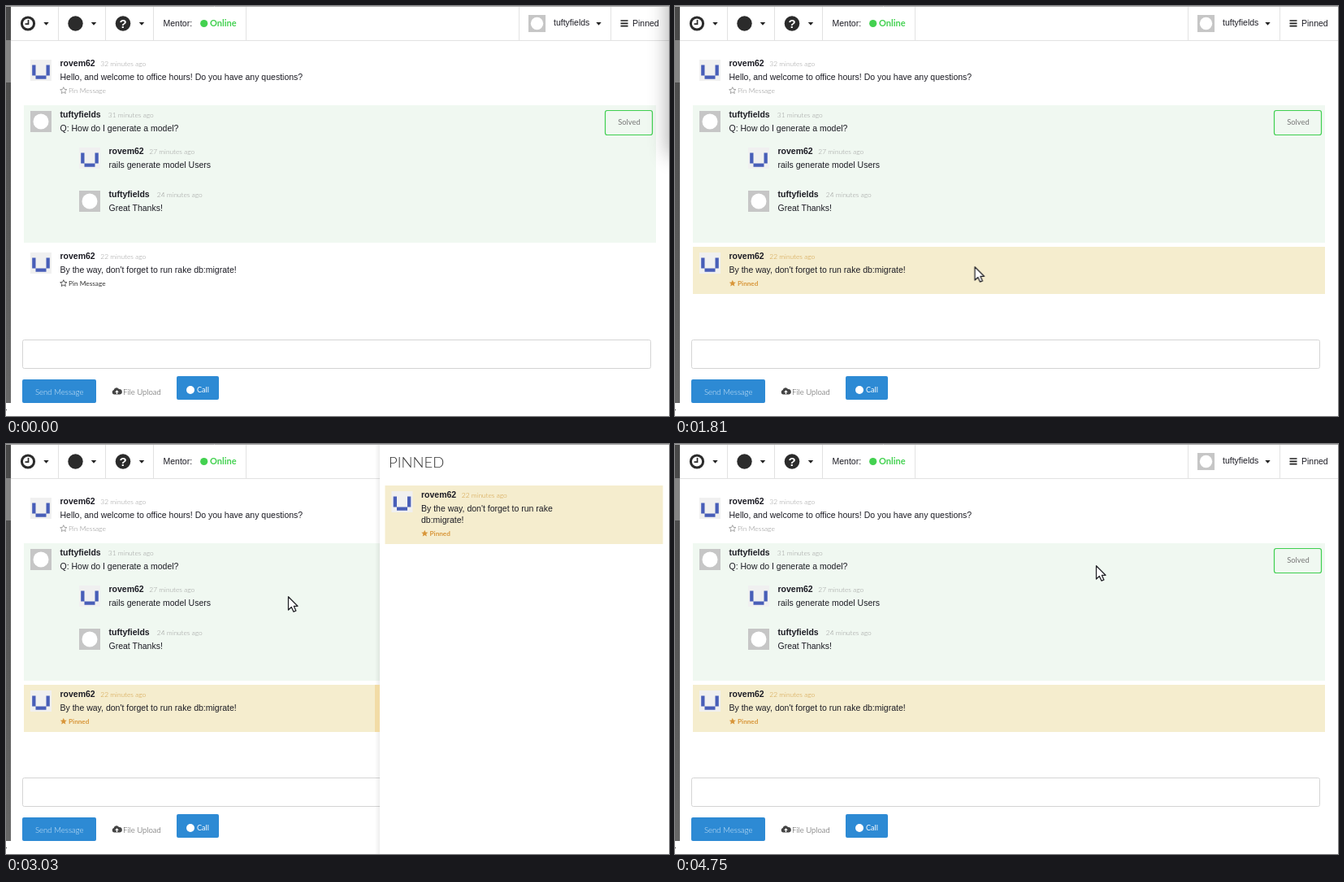
Write an HTML page that moves like this. It is 816 by 504 pixels and loops after 5.88 s.

```html
<!DOCTYPE html>
<html lang="en">
<head>
<meta charset="utf-8">
<title>Pin a message</title>
<style>
html, body { margin: 0; width: 100%; height: 100%; overflow: hidden; background: #fff; }
svg { display: block; width: 100vw; height: 100vh; }
text { font: 10.5px "Liberation Sans", Arial, sans-serif; fill: #1c1c24; }
.name { font-weight: bold; }
.lato { font-family: Lato, sans-serif; font-weight: 300; }
.small { font-size: 8.4px; fill: #999; }
.label { font-size: 9.6px; fill: #444; }
.link .small { font-size: 8.5px; fill: #8c8c8c; }
.link use { fill: none; stroke: #8f8f8f; stroke-width: .8; }
.dark .small { fill: #333; font-weight: 400; font-size: 8.3px; }
.dark use { stroke: #333; }
.pinned .small { fill: #d09a3c; }
.pinned .link .small { font-size: 8.2px; font-weight: 700; fill: #d8963a; }
.pinned .link use { fill: #d8963a; stroke: none; }

/* Every part shares one 5880 ms clock. */
.anim { animation: 5.88s linear infinite; }
.toggle { animation-timing-function: step-end; }
#edge { animation-name: edge; }
#plain { animation-name: plain; }
#pin-row { animation-name: pin-row; }
#idle-link { animation-name: idle-link; }
#hover-link { animation-name: hover-link; }
#panel { animation-name: panel; }
#panel-shade { animation-name: panel-shade; }
#pointer { animation-name: pointer; }
#arrow { animation-name: arrow; }
#hand { animation-name: hand; }

@keyframes edge { 0% { opacity: 1 } 23.13%, 100% { opacity: 0 } }
@keyframes plain { 0% { opacity: 1 } 24.66%, 100% { opacity: 0 } }
@keyframes pin-row { 0% { opacity: 0 } 24.66%, 100% { opacity: 1 } }
@keyframes idle-link { 0% { opacity: 0 } 1.7% { opacity: 1 } 15.4%, 100% { opacity: 0 } }
@keyframes hover-link { 0% { opacity: 1 } 1.7% { opacity: 0 } 15.4%, 100% { opacity: 1 } }
@keyframes panel {
  0%, 41.84% { transform: translateX(356px); animation-timing-function: ease }
  46.43%, 67.35% { transform: translateX(0); animation-timing-function: ease }
  71.94%, 100% { transform: translateX(356px) }
}
@keyframes panel-shade { 0% { opacity: 0 } 41.84% { opacity: 1 } 67.35%, 100% { opacity: 0 } }
@keyframes arrow { 0% { opacity: 0 } 1.02% { opacity: 1 } 35.7% { opacity: 0 } 46.9%, 100% { opacity: 1 } }
@keyframes hand { 0% { opacity: 0 } 35.7% { opacity: 1 } 46.9%, 100% { opacity: 0 } }
@keyframes pointer {
  0%, 1.02% { transform: translate(80px, 346px) }
  3.23%, 10.71% { transform: translate(152px, 388px) }
  13.4% { transform: translate(106px, 371px) }
  15.8% { transform: translate(58px, 351px) }
  18.37%, 28.74% { transform: translate(74px, 343px) }
  29.76% { transform: translate(205px, 396px) }
  30.78% { transform: translate(367px, 321px) }
  33.2% { transform: translate(560px, 190px) }
  36.2% { transform: translate(786px, 18px) }
  38.1%, 39.12% { transform: translate(776px, 24px) }
  41.5%, 46.77% { transform: translate(769px, 33px) }
  48.81% { transform: translate(540px, 60px) }
  50.6% { transform: translate(334px, 177px) }
  51.53%, 79.42% { transform: translate(347px, 187px) }
  80.78%, 100% { transform: translate(518px, 149px) }
}
</style>
</head>
<body>
<svg viewBox="0 0 816 504" preserveAspectRatio="none">
  <defs>
    <path id="star" d="M0-4.3 1.18-1.62 4.09-1.33 1.9.62 2.53 3.48 0 2-2.53 3.48-1.9.62-4.09-1.33-1.18-1.62Z"/>
    <path id="caret" d="M-3.2-1.5H3.2L0 2.2Z" fill="#222"/>
    <g id="mentor">
      <rect width="26" height="26" fill="#f0f0f0"/>
      <path d="M2.2 6.5h4.3v13h13v-13h4.3v13h-4.3v4.3h-13v-4.3h-4.3Z" fill="#485eb8"/>
    </g>
    <g id="student">
      <rect width="26" height="26" fill="#c6c6c6"/>
      <circle cx="13" cy="13" r="9.5" fill="#fff"/>
    </g>
    <linearGradient id="shade"><stop stop-opacity="0"/><stop offset="1" stop-opacity=".07"/></linearGradient>
    <linearGradient id="strip" x2="0" y2="1"><stop stop-color="#484848"/><stop offset="1" stop-color="#686868"/></linearGradient>
    <filter id="blur" x="-300%" y="-30%" width="700%" height="160%"><feGaussianBlur stdDeviation="12"/></filter>
  </defs>
  <rect width="816" height="504" fill="#fff"/>

  <g id="sidebar">
    <rect width="6" height="488" fill="url(#strip)"/>
    <rect y="42" width="6" height="52" fill="#848484"/>
    <rect y="496" width="1" height="1" fill="#333"/>
  </g>

  <g id="header">
    <path d="M6 42.5H816M64.5 1V42M122.5 1V42M181.5 1V42M295.5 1V42M631.5 1V42M744.5 1V42" stroke="#e2e2e2"/>
    <circle cx="27" cy="21.5" r="7.6" fill="none" stroke="#2b2b2b" stroke-width="3"/>
    <path d="M27.5 17V22.2H23.5" fill="none" stroke="#2b2b2b" stroke-width="1.7"/>
    <circle cx="85.5" cy="21.5" r="9.2" fill="#2b2b2b"/>
    <circle cx="144" cy="21.5" r="9.3" fill="#2b2b2b"/>
    <text x="144" y="27" text-anchor="middle" style="font-size:15px;font-weight:bold;fill:#fff">?</text>
    <use href="#caret" x="49.5" y="21.5"/><use href="#caret" x="108" y="21.5"/>
    <use href="#caret" x="167" y="21.5"/><use href="#caret" x="729.5" y="21.5"/>
    <text x="193.5" y="25">Mentor:</text>
    <circle cx="243.7" cy="21.5" r="4.6" fill="#43d150"/>
    <text class="lato" x="251" y="25" style="font-size:11px;font-weight:700;fill:#43d150">Online</text>
    <use href="#student" transform="translate(643 11) scale(.81)"/>
    <text x="674" y="24">tuftyfields</text>
    <path d="M756.5 18h9M756.5 21.3h9M756.5 24.6h9" stroke="#222" stroke-width="1.7"/>
    <text x="771" y="25">Pinned</text>
  </g>

  <rect x="22" y="122" width="778" height="169" fill="#f0f8f1"/>
  <rect x="737.5" y="128.5" width="58" height="30" rx="2.5" fill="none" stroke="#3fcf50" stroke-width="1.2"/>
  <text class="lato label" x="767" y="146" text-anchor="middle" style="font-size:9.4px;font-weight:400;fill:#777">Solved</text>
  <g id="thread"></g>
  <g id="plain" class="anim toggle"></g>
  <g id="pin-row" class="anim toggle pinned"></g>

  <g id="composer">
    <rect x="20.5" y="410.5" width="773" height="35" rx="2" fill="#fff" stroke="#d4d4d4"/>
    <rect x="20" y="459" width="91" height="29" rx="2" fill="#2d8ad4"/>
    <text class="lato label" x="36" y="477.5" style="fill:#d5eafa">Send Message</text>
    <path d="M133 477.5a2.8 2.8 0 0 1-.4-5.4a3.5 3.5 0 0 1 6.5-1a2.6 2.6 0 0 1 1 6.4Z" fill="#444"/>
    <path d="M135.8 477v-2.3h-1.7l2.4-2.5 2.4 2.5h-1.7v2.3Z" fill="#fff"/>
    <text class="lato label" x="144" y="477.5">File Upload</text>
    <rect x="210" y="455" width="52" height="29" rx="2" fill="#2d8ad4"/>
    <circle cx="227" cy="472" r="5" fill="#fff"/>
    <text class="lato label" x="235" y="475.3" style="font-size:9.1px;font-weight:400;fill:#fff">Call</text>
  </g>

  <g id="edge" class="anim toggle">
    <rect x="815" y="-20" width="26" height="204" fill="#000" opacity=".34" filter="url(#blur)"/>
  </g>

  <g id="panel" class="anim">
    <g id="panel-shade" class="anim toggle">
      <rect x="454" width="6" height="504" fill="url(#shade)"/>
      <rect x="454" y="296" width="6" height="58" fill="#f2dca6"/>
    </g>
    <rect x="460" width="356" height="504" fill="#fff"/>
    <text class="lato" x="471" y="29" style="font-size:18.5px;fill:#333">PINNED</text>
    <g id="panel-row" class="pinned"></g>
  </g>
  <path d="M0 .5H816" stroke="#a6a6a6"/>

  <g id="pointer" class="anim" fill="#fff" stroke="#25252a" stroke-width="1.3" stroke-linejoin="round">
    <path id="arrow" class="anim toggle" d="M.5.8V17L4.3 13.5 7 19.2 9.9 17.9 7.3 12.3H12Z"/>
    <g id="hand" class="anim toggle">
      <path d="M4 10 1.2 7.6Q.2 5.8 2 5.6L5 7V2.2Q5 .8 6.2.8T7.4 2.2V5.4H13Q15.5 5.6 15.5 8V11Q15.5 15 12 15H7.5Q5.6 15 4 12Z"/>
      <path d="M8.4 9v3M10.7 9v3M13 9v3" stroke-width=".8"/>
    </g>
  </g>
</svg>
<script>
const MENTOR = { name: "rovem62", icon: "mentor", timeX: 86.3 };
const STUDENT = { name: "tuftyfields", icon: "student", timeX: 95.8 };
const text = (x, y, cls, str) => `<text x="${x}" y="${y}" class="${cls}">${str}</text>`;

function link(label, y, id = "", cls = "") {
  const attrs = id ? `id="${id}" class="link anim toggle ${cls}"` : `class="link"`;
  return `<g ${attrs}><use href="#star" x="40.8" y="${y}"/>${text(47, y + 3.2, "lato small", label)}</g>`;
}

function message(x, y, who, minutes, lines, extra = "") {
  return `<g transform="translate(${x} ${y})">${extra}<use href="#${who.icon}"/>` +
    text(36.5, 8, "name", who.name) +
    text(who.timeX, 8.2, "lato small", `${minutes} minutes ago`) +
    lines.map((line, i) => text(36.5, 25 + 14 * i, "", line)).join("") + "</g>";
}

function pinnedMessage(x, y, width, lines) {
  const extra = 14 * (lines.length - 1);
  const back = `<rect x="-8" y="-7" width="${width}" height="${58 + extra}" fill="#f5edce"/>`;
  return message(x, y, MENTOR, 22, lines, back + link("Pinned", 38 + extra));
}

const fill = (id, html) => { document.getElementById(id).innerHTML = html; };
const tip = "By the way, don't forget to run rake db:migrate!";

fill("thread",
  message(30, 66, MENTOR, 32, ["Hello, and welcome to office hours! Do you have any questions?"], link("Pin Message", 38)) +
  message(30, 129, STUDENT, 31, ["Q: How do I generate a model?"]) +
  message(90, 174, MENTOR, 27, ["rails generate model Users"]) +
  message(90, 227, STUDENT, 24, ["Great Thanks!"]));
fill("plain", message(30, 303, MENTOR, 22, [tip],
  link("Pin Message", 38, "idle-link") + link("Pin Message", 38, "hover-link", "dark")));
fill("pin-row", pinnedMessage(30, 303, 778, [tip]));
fill("panel-row", pinnedMessage(474.5, 58, 342, ["By the way, don't forget to run rake", "db:migrate!"]));
</script>
</body>
</html>
```
